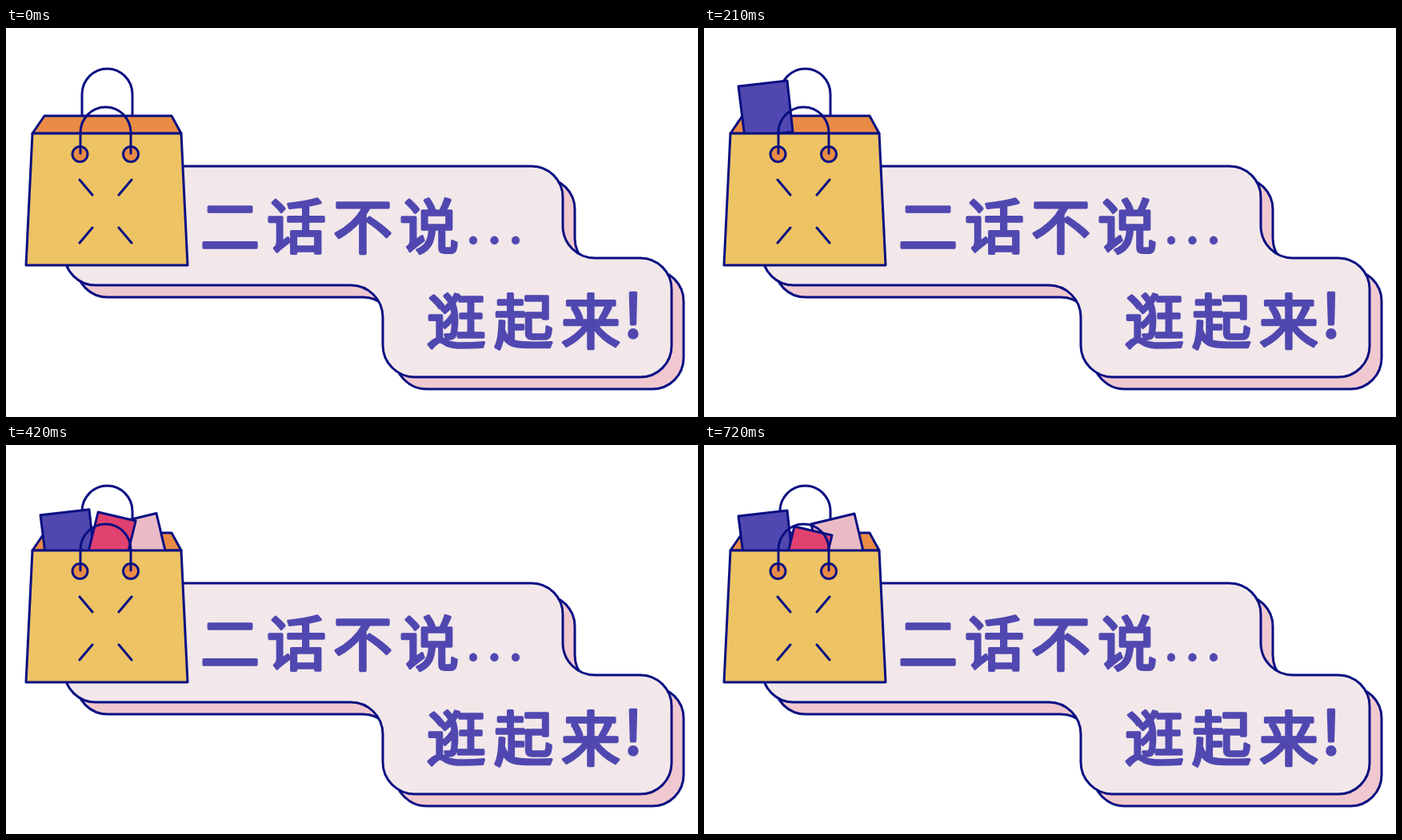
Recreate the animation shown at these times as an HTML page. Size 865x487 px, loop 2700 ms.

```html
<!DOCTYPE html>
<html lang="zh-CN">
<head>
<meta charset="utf-8">
<style>
  html, body { margin: 0; width: 100%; height: 100%; overflow: hidden; background: #fff; }
  svg { display: block; }
  .line { fill: none; stroke: #0a0f82; stroke-width: 3; stroke-linecap: round; stroke-linejoin: round; }
  text { font: 400 74px "Noto Sans CJK SC", "Noto Sans CJK", sans-serif; fill: #5048b0;
         stroke: #5048b0; stroke-width: 3.6; stroke-linejoin: round; }
</style>
</head>
<body>
<svg width="865" height="487" viewBox="0 0 865 487">
  <defs>
    <path id="panel" d="M112 173H657A39 39 0 0 1 696 212V248A40 40 0 0 0 736 288H793A39 39 0 0 1 832 327V398A39 39 0 0 1 793 437H511A40 40 0 0 1 471 397V362A40 40 0 0 0 431 322H112A39 39 0 0 1 73 283V212A39 39 0 0 1 112 173Z"/>
  </defs>
  <g class="line">
    <use href="#panel" x="15" y="15" fill="#f0c8cf"/>
    <use href="#panel" fill="#f2e7e9"/>
  </g>

  <text x="243" y="276" letter-spacing="9">二话不说</text>
  <text x="573.7" y="270" letter-spacing="6" style="stroke-width:.5">...</text>
  <text x="526" y="394.5" letter-spacing="10">逛起来</text>
  <text x="772" y="387">!</text>

  <g class="line">
    <path d="M95 110V83A31.5 32 0 0 1 158 83V110"/>
    <path d="M48 110H207L219 132H33Z" fill="#e98b45"/>
    <g id="items">
      <path d="M134 99L188 86L201 141L147 155Z" fill="#eabac6"/>
      <path d="M43 89L104 82L111 146L51 153Z" fill="#5048b0"/>
      <path d="M113 102L160 113L147 166L100 155Z" fill="#e1416e"/>
    </g>
    <path d="M33 132H219L227 297H25Z" fill="#edc364"/>
    <g fill="#e98b45">
      <circle cx="92.5" cy="158" r="9.5"/>
      <circle cx="156" cy="158" r="9.5"/>
    </g>
    <path d="M93 157V131A31.5 32 0 0 1 156 131V157"/>
    <path d="M92 190L108 209M157 190L141 209M92 269L108 250M157 269L141 250"/>
  </g>
</svg>
<script>
  const LOOP = 2700, STEP = 30;
  // Shared drop: [ms since start, offset from rest], with one rebound
  const drop = [[0, -56], [240, 8], [270, 4.5], [300, -4], [390, 0]];
  // Same order as the shapes in #items
  const motion = [
    { start: 212, scale: 0.875, drift: 0 },
    { start: 60, scale: 1, drift: 0 },
    { start: 330, scale: 0.5625, drift: -0.12 },
  ];
  const shapes = document.querySelectorAll("#items path");

  function offset(t) {
    const i = drop.findIndex(([time]) => time > t);
    if (i < 0) return 0;
    const [t0, y0] = drop[i - 1], [t1, y1] = drop[i];
    return y0 + (y1 - y0) * (t - t0) / (t1 - t0);
  }

  function draw(now) {
    const t = Math.floor(now % LOOP / STEP) * STEP;
    motion.forEach(({ start, scale, drift }, i) => {
      const shown = t >= start;
      shapes[i].style.display = shown ? "" : "none";
      if (!shown) return;
      const y = offset(t - start) * scale;
      shapes[i].setAttribute("transform", `translate(${y * drift} ${y})`);
    });
    requestAnimationFrame(draw);
  }
  draw(0);
</script>
</body>
</html>
```
